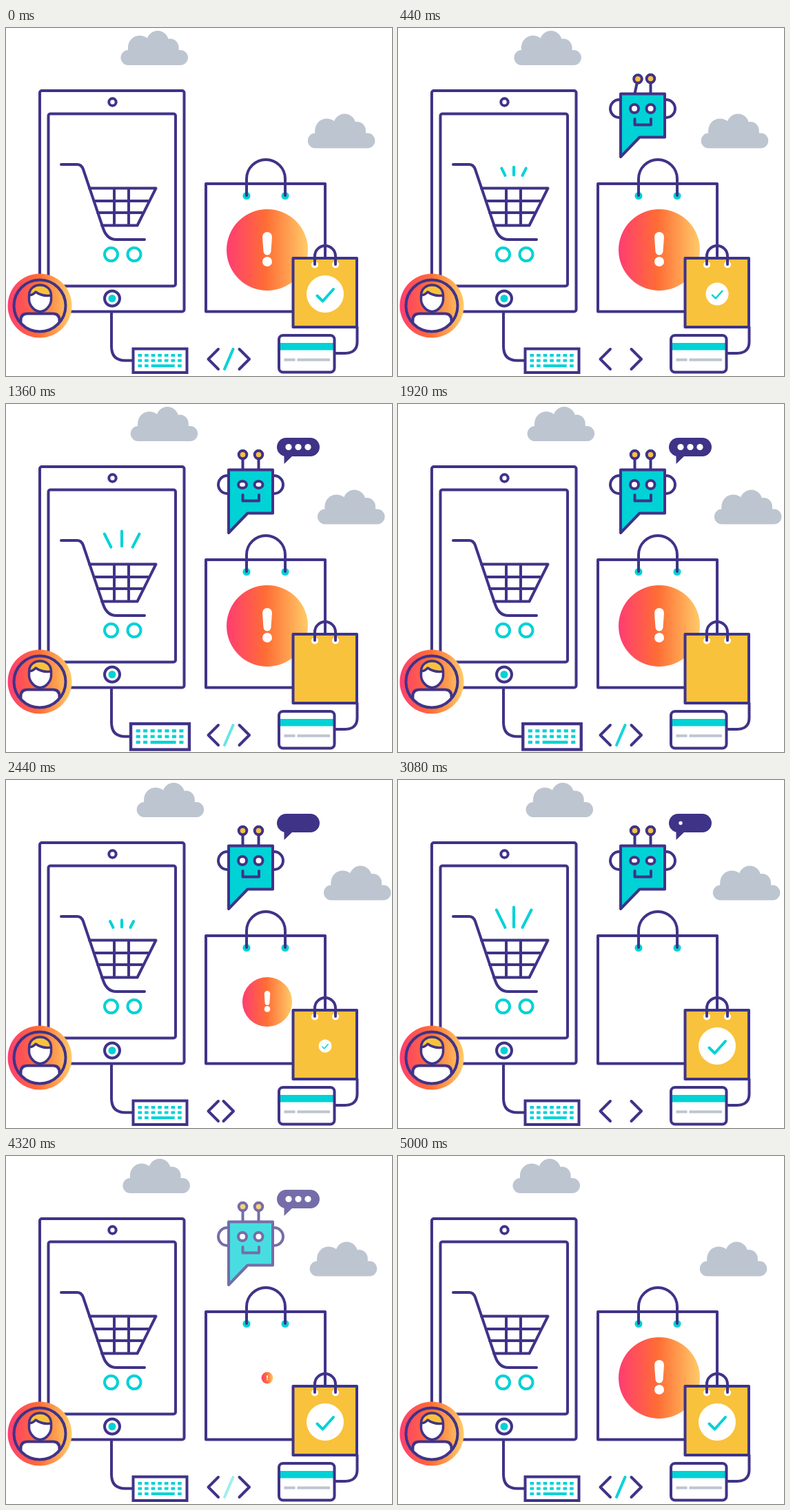
An HTML page that plays this animation: 560x505 px, repeating every 5.04 s.

```html
<!DOCTYPE html>
<html lang="en">
<head>
<meta charset="utf-8">
<title>Shopping assistant</title>
<style>
  html, body { margin: 0; width: 100%; height: 100%; overflow: hidden; background: #fff; }
  svg { display: block; width: 560px; height: 505px; }
  .ink { stroke: #3f3388; }
  .cyan { stroke: #00d2d6; }
  .ink, .cyan { fill: none; stroke-width: 4; stroke-linecap: round; stroke-linejoin: round; }
  .white { fill: #fff; }
  .teal { fill: #00d2d6; }
  .gold { fill: #f9c23c; }
  .dark { fill: #3f3388; }
  .grey { fill: #bdc5d0; }
</style>
</head>
<body>
<svg viewBox="0 0 560 505">
  <defs>
    <linearGradient id="sunset">
      <stop offset="0" stop-color="#ff3d72"/>
      <stop offset=".48" stop-color="#ff6d35"/>
      <stop offset="1" stop-color="#ffcb68"/>
    </linearGradient>
    <clipPath id="ring"><circle cx="49" cy="403" r="37.5"/></clipPath>
    <g id="cloud" class="grey">
      <rect x="166.5" y="32" width="97.5" height="22" rx="11"/>
      <circle cx="194" cy="28" r="17"/>
      <circle cx="220" cy="20" r="16"/>
      <circle cx="238" cy="28" r="12.5"/>
      <path d="M177 28H250.5V45H177Z"/>
    </g>
  </defs>

  <g id="clouds">
    <use href="#cloud"/>
    <use href="#cloud" x="271.3" y="120.5"/>
  </g>

  <!-- tablet and cart -->
  <g class="ink">
    <path d="M153 412V462Q153 482.500 173 482.500H184"/>
    <rect class="white" x="49" y="91" width="209.500" height="320.500" rx="3"/>
    <rect x="61.500" y="124.500" width="184.500" height="250" rx="3"/>
    <circle cx="154.500" cy="107.500" r="5.200"/>
    <circle cx="154" cy="392.500" r="11"/>
    <path d="M80 198H103Q109.500 198 112 205L141 291Q146.500 307 160 307H201"/>
    <path d="M121 232.500H217.500L190.500 286.500H139M128 251H207.500M133 268H199.500M157 233V286M178 233V286"/>
  </g>
  <circle class="teal" cx="154" cy="392.500" r="5.500"/>
  <circle class="cyan" cx="152.500" cy="328.500" r="9.500"/>
  <circle class="cyan" cx="186" cy="328.500" r="9.500"/>
  <g id="rays" class="cyan"></g>

  <!-- shopper -->
  <circle cx="49" cy="403" r="46.500" fill="url(#sunset)"/>
  <path class="ink white" clip-path="url(#ring)" d="M21.500 445V424Q21.500 414.500 31 414.500H68Q77.500 414.500 77.500 424V445Z"/>
  <circle class="ink" cx="49" cy="403" r="37.500"/>
  <path class="white" d="M33.500 388C33.500 368 65.500 368 65.500 388V394C65.500 402 58 411.500 49.500 411.500S33.500 402 33.500 394Z"/>
  <path class="gold" d="M33.500 388C33.500 368 65.500 368 65.500 388Q53 390 43 383Q40 387 33.500 388Z"/>
  <path class="ink" style="stroke-width:3.500" d="M33.500 388C33.500 368 65.500 368 65.500 388V394C65.500 402 58 411.500 49.500 411.500S33.500 402 33.500 394ZQ40 387 43 383Q53 390 65.500 388"/>

  <g id="keyboard">
    <rect class="ink white" x="184.500" y="465.500" width="78" height="34.500" style="stroke-linejoin:miter"/>
  </g>

  <!-- code sign -->
  <path class="ink" d="M308 466L293.500 480.500L308 495"/>
  <path id="bracket" class="ink" d="M338.500 466L353 480.500L338.500 495"/>
  <path id="slash" class="cyan" d="M329.500 466L317 495"/>

  <!-- large bag -->
  <rect class="ink" x="290" y="226" width="173" height="185.500"/>
  <circle class="teal" cx="349" cy="243.500" r="5.500"/>
  <circle class="teal" cx="405" cy="243.500" r="5.500"/>
  <path class="ink" d="M349 243V219A28 28 0 0 1 405 219V243"/>
  <g id="alert">
    <circle cx="379" cy="322" r="59" fill="url(#sunset)"/>
    <path class="white" d="M372 303a7 7 0 0 1 14 0l-1.500 21a5.500 5.500 0 0 1-11 0Z"/>
    <circle class="white" cx="379" cy="339" r="7"/>
  </g>

  <!-- small bag and card -->
  <path class="ink" d="M509.500 434V455Q509.500 472 492 472H477"/>
  <rect class="ink gold" x="416.500" y="334" width="92.500" height="100"/>
  <circle class="white" cx="448" cy="343.500" r="5"/>
  <circle class="white" cx="478" cy="343.500" r="5"/>
  <path class="ink" d="M448 343V331A15 15 0 0 1 478 331V343"/>
  <g id="check">
    <circle class="white" cx="463" cy="386" r="27"/>
    <path class="cyan" d="M451.500 388.500L459.500 396.500L475 379"/>
  </g>
  <rect class="white" x="396" y="446" width="80.500" height="53.500" rx="6"/>
  <path class="teal" d="M396 457H476V467.500H396Z"/>
  <path class="grey" d="M403.500 479.500H419.500V483.500H403.500ZM422.500 479.500H470V483.500H422.500Z"/>
  <rect class="ink" x="396" y="446" width="80.500" height="53.500" rx="6"/>

  <g id="robot">
    <g class="ink">
      <path d="M323 104H321a13 13 0 0 0 0 26H323M387 104H389a13 13 0 0 1 0 26H387M366.500 80V95"/>
      <circle class="gold" cx="366.500" cy="73.500" r="5.800"/>
      <g id="antenna">
        <path d="M343.500 80V95"/>
        <circle class="gold" cx="343.500" cy="73.500" r="5.800"/>
      </g>
      <path class="teal" d="M323 95.500H387V158.500H350.500L323 187Z"/>
      <ellipse class="eye white" cx="343" cy="117" rx="6" ry="6"/>
      <ellipse class="eye white" cx="366.500" cy="117" rx="6" ry="6"/>
      <path d="M343.500 132V140.500H367V132"/>
    </g>
    <g id="bubble">
      <rect class="dark" x="393" y="49" width="62" height="27" rx="13.500"/>
      <path class="dark" d="M403.500 72V87L416 75Z"/>
      <circle class="dot white" cx="410" cy="62.500"/>
      <circle class="dot white" cx="424" cy="62.500"/>
      <circle class="dot white" cx="438" cy="62.500"/>
    </g>
  </g>
</svg>
<script>
const LOOP = 5040, STEP = 40;
const $ = id => document.getElementById(id);

function add(parent, tag, attrs) {
  const el = document.createElementNS("http://www.w3.org/2000/svg", tag);
  for (const k in attrs) el.setAttribute(k, attrs[k]);
  return parent.appendChild(el);
}

// Keyboard: seven columns, with a space bar in the last row
for (let row = 0; row < 3; row++)
  for (let col = 0; col < 7; col++) {
    const bar = row === 2 && col === 2;
    if (row === 2 && col > 2 && col < 6) continue;
    add($("keyboard"), "rect", {
      class: "teal", x: 191.5 + col * 9.6, y: 473 + row * 7.6, width: bar ? 34 : 5.6, height: 4
    });
  }

const rays = [[155.5, 214, 142.8, 188.5], [168, 213.5, 168, 184.5], [180.5, 214, 193.5, 188.5]]
  .map(pos => ({ pos, el: add($("rays"), "line", {}) }));
const eyes = [...document.querySelectorAll(".eye")];
const dots = [...document.querySelectorAll(".dot")];

const mix = (a, b, p) => a + (b - a) * p;
function ease(t, start, dur) {
  const p = Math.min(1, Math.max(0, (t - start) / dur));
  return p * p * (3 - 2 * p);
}
const hump = (t, up, down, dur) => ease(t, up, dur) - ease(t, down, dur);
const wave = p => (1 - Math.cos(Math.PI * Math.min(1, p))) / 2;

function scale(id, x, y, s) {
  $(id).setAttribute("transform", `translate(${x} ${y}) scale(${s}) translate(${-x} ${-y})`);
}

function draw(t) {
  const drift = 23.2 * (t < 2380 ? wave(t / 2380) : 1 - wave((t - 2380) / 2520));
  $("clouds").setAttribute("transform", `translate(${drift})`);

  const second = t > 2000;
  const tip = ease(t, second ? 2280 : 265, 400);
  const tail = ease(t, second ? 3760 : 1230, 400);
  for (const { pos: [x1, y1, x2, y2], el } of rays) {
    el.setAttribute("x1", mix(x1, x2, tail));
    el.setAttribute("y1", mix(y1, y2, tail));
    el.setAttribute("x2", mix(x1, x2, tip));
    el.setAttribute("y2", mix(y1, y2, tip));
  }
  $("rays").style.display = tip - tail > .01 ? "" : "none";

  scale("keyboard", 223.5, 482.7, 1 + .095 * (hump(t, 1060, 1840, 360) + hump(t, 3100, 3640, 360)));
  scale("alert", 379, 322, 1 - hump(t, 2270, 4225, 400));
  scale("check", 463, 386, 1 - hump(t, 270, 2280, 400));

  $("slash").style.opacity = 1 - hump(t, 80, 1220, 250) - hump(t, 1880, 4220, 240);
  const shut = hump(t, 460, 820, 340) + hump(t, 2080, 2500, 340);
  $("bracket").setAttribute("transform", `translate(${-23 * shut})`);

  $("robot").style.opacity = hump(t, 80, 4200, 340);
  $("bubble").style.opacity = ease(t, 600, 280);
  const sway = 12 * hump(t, 240, 480, 200);
  $("antenna").setAttribute("transform", `rotate(${sway} 343.5 95)`);
  const blink = hump(t, 1300, 1420, 120) + hump(t, 3020, 3140, 120);
  for (const eye of eyes) eye.setAttribute("ry", 6 - 2 * blink);
  dots.forEach((dot, i) => {
    const lag = i * 130;
    dot.setAttribute("r", 4.6 * (hump(t, 840 + lag, 1990 + lag, 200) + ease(t, 2970 + lag, 200)));
  });
}

function tick() {
  draw(Math.floor(performance.now() % LOOP / STEP) * STEP);
  requestAnimationFrame(tick);
}
tick();
</script>
</body>
</html>
```
